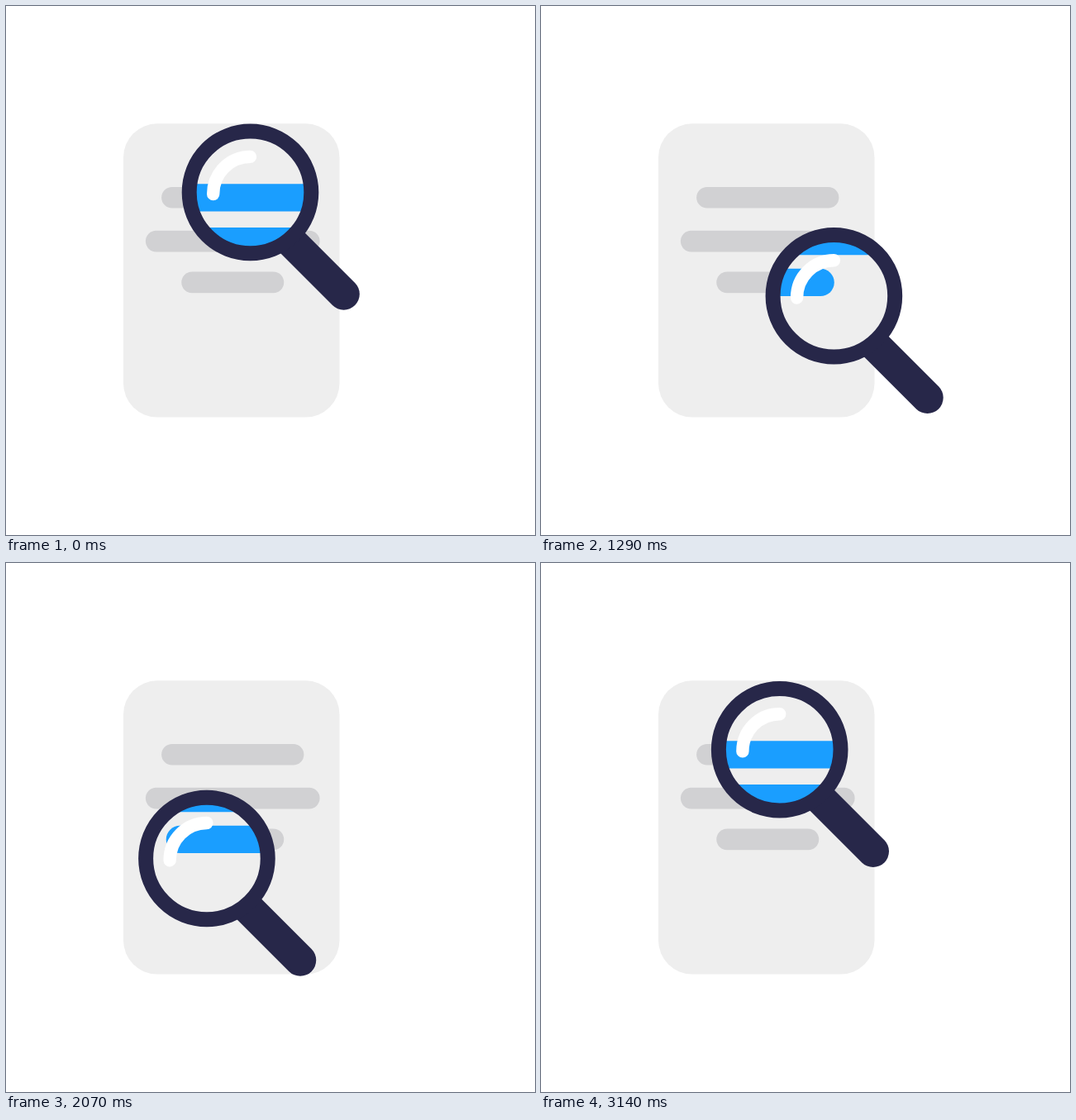
Animation, 640 px wide and 640 px high, one loop 3210 ms. Source, as an HTML page:

```html
<!DOCTYPE html>
<html lang="en">
<head>
<meta charset="utf-8">
<title>Document search</title>
<style>
  html, body { margin: 0; width: 100%; height: 100%; overflow: hidden; background: #fff; }
  svg { display: block; width: 100%; height: 100%; }
</style>
</head>
<body>
<svg viewBox="0 0 640 640">
  <defs>
    <clipPath id="lens"><circle class="move" r="66"/></clipPath>
  </defs>
  <rect x="142" y="142.3" width="261.5" height="355.2" rx="41" fill="#eee"/>
  <g id="lines" fill="#d1d1d3"></g>
  <g class="move">
    <path d="M47.1 57.1L113.1 123.1" stroke="#272749" stroke-width="38.4" stroke-linecap="round"/>
    <circle r="73.8" fill="#eee"/>
  </g>
  <g id="zoomed" fill="#1a9eff" clip-path="url(#lens)"></g>
  <g class="move" fill="none">
    <circle r="73.8" stroke="#272749" stroke-width="18"/>
    <path d="M-44.8 2.2A45 45 0 0 1 0 -43" stroke="#fff" stroke-width="15.4" stroke-linecap="round"/>
  </g>
</svg>
<script>
  const LOOP = 3210, FPS = 14, STEPS = 45;
  const ORBIT = { x: 295.5, y: 301.9, r: 76.5 };

  // Text bars share one centre: [middle y, width]
  const BARS = [[231.8, 172.3], [284.6, 210.7], [334.4, 123.9]];

  // Orbit keys: [step, degrees clockwise from the top]
  const KEYS = [[0, 0], [7, 47], [8, 54.1], [14, 91.4], [16, 111], [22, 164.7], [24, 179.3],
                [29, 223.4], [32, 252.8], [35, 277], [40, 320.8], [44, 354.9], [45, 360]];

  function addBars(id, scale) {
    const group = document.getElementById(id);
    for (const [y, width] of BARS) {
      const bar = document.createElementNS("http://www.w3.org/2000/svg", "rect");
      const w = width * scale, h = 25.6 * scale;
      const attrs = { x: 274.25 - w / 2, y: y - h / 2, width: w, height: h, rx: h / 2 };
      for (const name in attrs) bar.setAttribute(name, attrs[name]);
      group.append(bar);
    }
  }
  addBars("lines", 1);
  addBars("zoomed", 1.3);

  const last = KEYS.length - 1;
  const rates = KEYS.slice(1).map(([s, a], i) => (a - KEYS[i][1]) / (s - KEYS[i][0]));
  const slopes = KEYS.map((_, i) => {
    const before = rates[(i + last - 1) % last], after = rates[i % last];
    return 2 * before * after / (before + after);
  });

  // Smooth monotone curve through the keys
  function angleAt(step) {
    let i = 0;
    while (i < last - 1 && step >= KEYS[i + 1][0]) i++;
    const [s0, a0] = KEYS[i], [s1, a1] = KEYS[i + 1];
    const d = s1 - s0, u = (step - s0) / d, v = 1 - u;
    return a0 * v * v * (1 + 2 * u) + a1 * u * u * (3 - 2 * u)
         + d * u * v * (slopes[i] * v - slopes[i + 1] * u);
  }

  const movers = document.querySelectorAll(".move");
  const start = performance.now();

  function draw(now) {
    const time = Math.max(0, now - start) % LOOP;
    const step = Math.floor((time + 5) * FPS / 1000) % STEPS;
    const a = angleAt(step) * Math.PI / 180;
    const x = ORBIT.x + ORBIT.r * Math.sin(a), y = ORBIT.y - ORBIT.r * Math.cos(a);
    for (const el of movers) el.setAttribute("transform", `translate(${x} ${y})`);
    requestAnimationFrame(draw);
  }
  draw(start);
</script>
</body>
</html>
```
